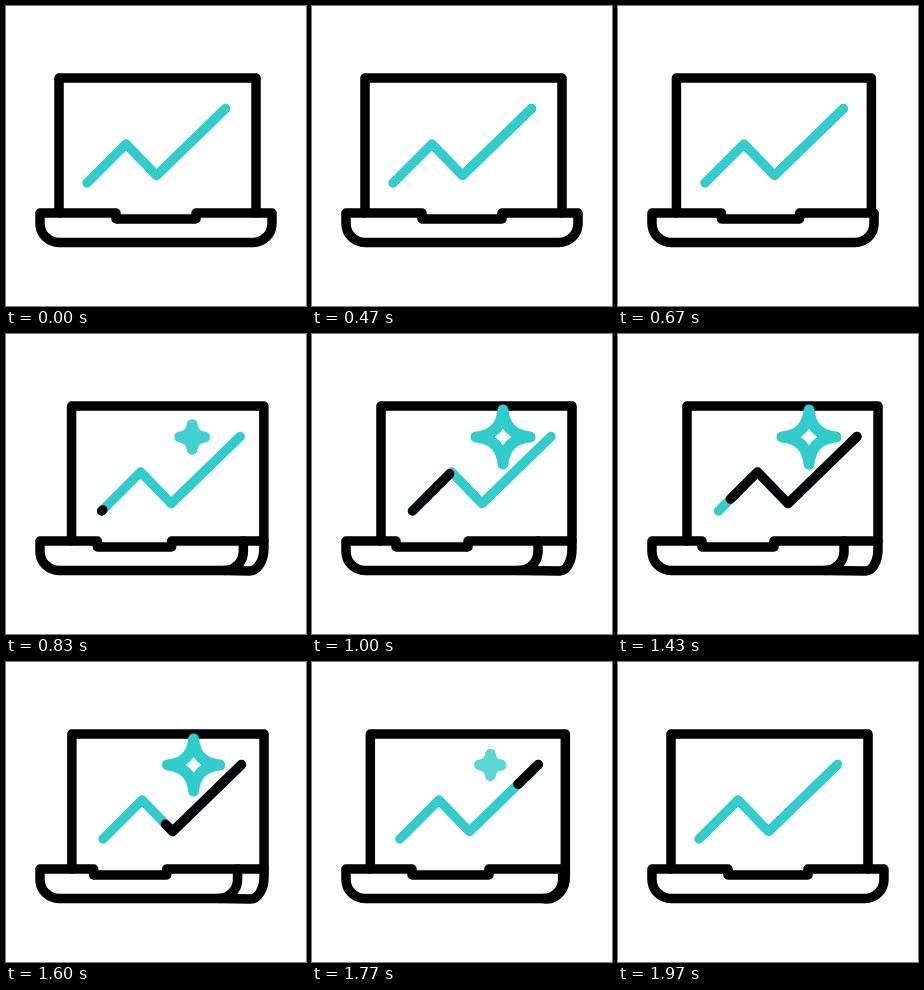
An HTML page that plays this animation: 300x300 px, repeating every 2.5 s.

```html
<!DOCTYPE html>
<html lang="en">
<head>
<meta charset="utf-8">
<title>Laptop chart</title>
<style>
  html, body { margin: 0; width: 100%; height: 100%; overflow: hidden; background: #fff; }
  svg { display: block; width: 100%; height: 100%; }
  path { fill: none; stroke: #000; stroke-width: 9.5; stroke-linecap: round; stroke-linejoin: round; }
  .teal { stroke: #3cc; }
  #star { stroke-width: 11; }
</style>
</head>
<body>
<svg viewBox="0 0 300 300">
  <path id="screen"/>
  <path id="side"/>
  <path id="base"/>
  <g id="chart">
    <path class="teal" d="M81 177L120 138L150.5 169.5L219.5 102.5"/>
    <path id="run" pathLength="1" d="M81 177L120 138L150.5 169.5L219.5 102.5"/>
    <path id="star" class="teal"/>
  </g>
</svg>
<script>
  const LOOP = 2500;
  const el = id => document.getElementById(id);
  const [screenEl, side, base, chart, run, star] =
    ['screen', 'side', 'base', 'chart', 'run', 'star'].map(el);

  const mix = (a, b, p) => a + (b - a) * p;
  const ease = (t, from, to) => {
    const p = Math.min(1, Math.max(0, (t - from) / (to - from)));
    return p * p * (3 - 2 * p);
  };
  // Rises to 1, then falls back to 0
  const swing = (t, a, b, c, d) => ease(t, a, b) - ease(t, c, d);

  function drawLaptop(t) {
    const lid = swing(t, 470, 985, 1455, 1970);
    const turn = swing(t, 510, 1005, 1485, 1980);
    const left = mix(53, 69, lid), right = mix(250, 260, lid);
    const front = mix(266, 226, turn);
    const n1 = mix(110, 84, turn), n2 = mix(190, 156, turn);

    screenEl.setAttribute('d', `M${left} 207V72H${right}V207`);
    base.setAttribute('d',
      `M34 207H${n1}V213H${n2}V207H${front}V217.5A19 19 0 0 1 ${front - 19} 236.5H53A19 19 0 0 1 34 217.5Z`);

    const gap = right - front;
    side.style.display = gap > 0 ? '' : 'none';
    if (gap > 0) {
      const rx = mix(19, 12, gap / 34);
      side.setAttribute('d',
        `M${front} 207H${right}V215A${rx} 22 0 0 1 ${right - rx} 237L${front - 19} 236.5`);
    }
  }

  function drawStar(size) {
    star.style.display = size > 0.01 ? '' : 'none';
    const r = 27 * size, c = 2 * size, x = 171.5, y = 103;
    star.setAttribute('d',
      `M${x} ${y - r}Q${x + c} ${y - c} ${x + r} ${y}Q${x + c} ${y + c} ${x} ${y + r}` +
      `Q${x - c} ${y + c} ${x - r} ${y}Q${x - c} ${y - c} ${x} ${y - r}Z`);
    star.style.opacity = Math.min(1, size * 2);
  }

  function drawChart(t) {
    const shift = 19.5 * swing(t, 480, 1000, 1465, 1975);
    chart.setAttribute('transform', `translate(${shift} 0)`);

    const head = ease(t, 800, 1390), tail = ease(t, 1325, 1912);
    const len = head - tail;
    run.style.display = len > 0.001 ? '' : 'none';
    run.style.strokeDasharray = `${len} 3`;
    run.style.strokeDashoffset = -tail;

    drawStar(swing(t, 680, 1000, 1560, 1930));
  }

  const start = performance.now();
  function frame(now) {
    const t = Math.max(0, now - start) % LOOP;
    drawLaptop(t);
    drawChart(t);
    requestAnimationFrame(frame);
  }
  frame(start);
</script>
</body>
</html>
```
